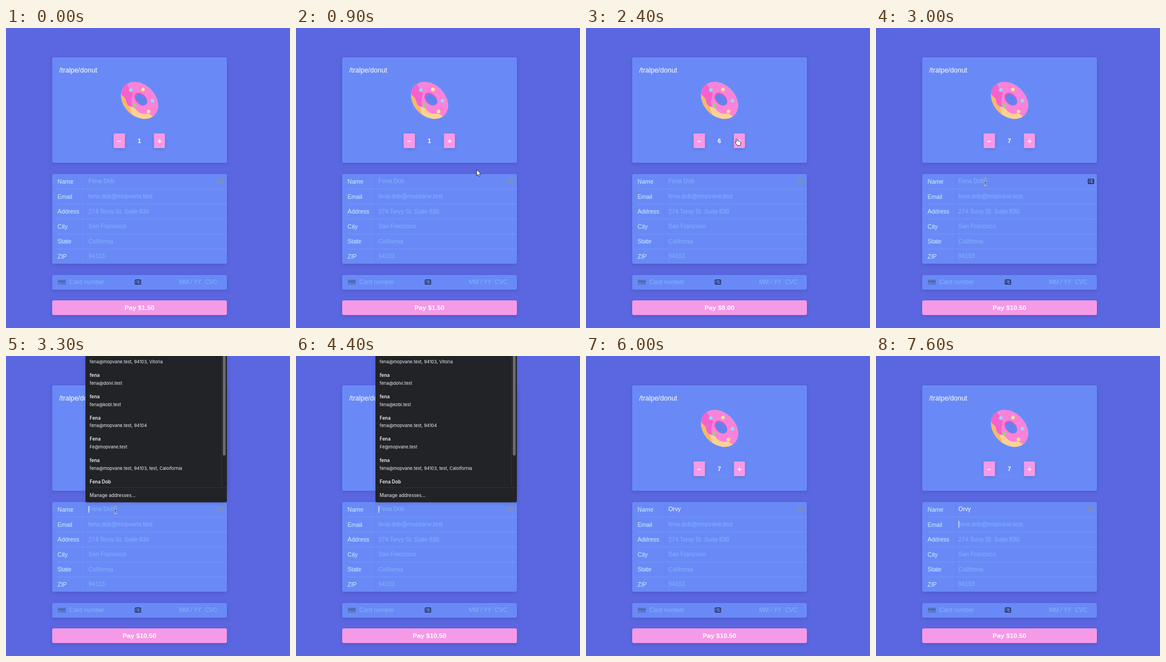
Recreate the animation shown at these times as an HTML page. Size 504x532 px, loop 8 s.

```html
<!DOCTYPE html>
<html lang="en">
<head>
<meta charset="utf-8">
<title>Donut checkout</title>
<style>
  html, body { margin: 0; width: 100%; height: 100%; overflow: hidden; background: #5a67e1; }
  svg { display: block; width: 504px; height: 532px; }
  text { font: 10.45px "Liberation Sans", Arial, sans-serif; white-space: pre; }
  .card { fill: #698af6; }
  .raised { filter: drop-shadow(0 2px 3px rgba(40, 42, 110, .22)); }
  .label { fill: #d2f0ff; }
  .hint { fill: #82b3fa; }
  .white { fill: #fff; }
  .bold { font-weight: 700; fill: #fff; text-anchor: middle; }
  .pink { fill: #f59ae6; }
  .rule { stroke: #7a9af8; stroke-width: .8; }
  .popup text { font: 7.85px Inter, "Open Sans", sans-serif; fill: #f0f0f1; }
  .popup .who { font-size: 8.3px; font-weight: 600; }
  .popup .manage { font-size: 8.25px; }
  .cursor { fill: #fff; stroke: #111; stroke-width: .8; stroke-linejoin: round; }
</style>
</head>
<body>
<svg viewBox="0 0 504 532">
  <defs>
    <clipPath id="dough"><ellipse cx="237" cy="128.5" rx="37" ry="28" transform="rotate(45 237 128.5)"/></clipPath>
    <clipPath id="hole"><ellipse cx="239.3" cy="126" rx="13.2" ry="9.2" transform="rotate(45 239.3 126)"/></clipPath>
    <clipPath id="list"><rect x="141" y="0" width="251" height="230"/></clipPath>
    <g id="badge">
      <rect x=".6" y=".6" width="9.8" height="7.8" rx="1" fill="none" stroke="currentColor" stroke-width="1.2"/>
      <circle cx="3.6" cy="3.6" r="1.2" fill="currentColor"/>
      <path d="M1.6 6.9q2-2.7 4 0z" fill="currentColor"/>
      <path d="M6.6 3.2h2.6M6.6 5.4h2.6" stroke="currentColor"/>
    </g>
  </defs>

  <rect width="504" height="532" fill="#5a67e1"/>
  <rect class="card raised" x="82" y="52" width="310" height="187" rx="2.7"/>
  <text class="white" x="94.5" y="78.5" style="font-size:12.1px">/tralpe/donut</text>

  <g clip-path="url(#dough)">
    <rect x="200" y="90" width="75" height="75" fill="#fdd295"/>
    <path d="M200 100L216 128L226 160L200 160z" fill="#f9b768"/>
    <path d="M200 90H275V158C268 161 262 159 257 154C251 149 246 154 239 151C231 148 231 141 224 140C217 139 214 135 213 128C211 121 206 122 203 114z" fill="#fb82da"/>
    <path d="M200 90H216C211 102 221 107 224 114C227 122 219 126 224 140C217 139 214 135 213 128C211 121 206 122 203 114z" fill="#f661cc"/>
  </g>
  <g clip-path="url(#hole)">
    <rect x="224" y="110" width="32" height="32" fill="#e457bd"/>
    <ellipse cx="240.4" cy="127.4" rx="12.2" ry="8" transform="rotate(45 240.4 127.4)" fill="#6482ee"/>
  </g>
  <g id="sprinkles"></g>

  <rect x="211" y="187.5" width="52" height="25.5" fill="none" stroke="#7090f6" stroke-width=".8"/>
  <g class="raised">
    <path class="pink" d="M211 187H193q-2 0-2 2v22q0 2 2 2h18z"/>
    <path class="pink" d="M262.5 187H280q2 0 2 2v22q0 2-2 2h-17.5z"/>
  </g>
  <path d="M197.8 200.9h6M269.2 200.9h6.6M272.5 197.6v6.6" stroke="#fff" stroke-width="1.5"/>
  <text class="bold" id="qty" x="236.6" y="204"></text>

  <rect class="card raised" x="82" y="259" width="310" height="159" rx="2.7"/>
  <path d="M141.3 259V418" stroke="#6180ee" stroke-width=".6"/>
  <g id="form"></g>
  <use href="#badge" id="nameBadge" x="376" y="267.4"/>
  <text class="white" id="typed" x="146.3" y="275.4"></text>

  <rect class="card raised" x="82" y="438" width="310" height="26" rx="2.7"/>
  <g fill="#5876c6">
    <rect x="92" y="446.2" width="14" height="9" rx="1"/>
    <path d="M92 448.4h14v2H92z" fill="#4a63aa"/>
    <path d="M93.5 452.6h4v1h-4z" fill="#7394ea"/>
  </g>
  <text class="hint" x="112.5" y="454.2" style="font-size:10.6px">Card number</text>
  <use href="#badge" x="228.6" y="446" color="#171b33"/>
  <text class="hint" x="307" y="454.2">MM / YY</text>
  <text class="hint" x="353" y="454.2">CVC</text>

  <rect class="pink raised" x="82" y="483" width="310" height="26" rx="2.7"/>
  <text class="bold" id="pay" x="236.8" y="500.3" style="font-size:11.7px"></text>

  <g id="popup" class="popup">
    <path class="raised" d="M141 0H392V256.5q0 3-3 3H144q-3 0-3-3z" fill="#222327"/>
    <g id="people" clip-path="url(#list)"></g>
    <path d="M382.5 0V230M141 233.3H392" stroke="#37383c" stroke-width=".8"/>
    <rect x="384.8" y="-6" width="5" height="182.5" rx="2.5" fill="#6b6c6f"/>
    <text class="manage" x="148.6" y="249.7">Manage addresses...</text>
  </g>

  <rect id="caret" width="1" height="12" fill="#fff"/>
  <g id="cursor" class="cursor">
    <path id="arrow" d="M0 0V11L2.6 8.7L4.4 12.6L6.2 11.8L4.5 8H8z"/>
    <path id="hand" d="M-2.6-4.6q1-1.4 2 0l1.1 3.3q1-1 1.7.2q1-.8 1.7.3q1.2-.5 1.5.9q.7 2.2-.3 4.2l-.2 2.2h-5.2q-.6-1.6-2-2.8l-2.4-2.6q.2-1.7 2.3-.4z"/>
    <g id="beam" fill="none">
      <path d="M-2.3-5.6q2 0 2.3 1.2q.3-1.2 2.3-1.2M0-4.4V4.4M-2.3 5.6q2 0 2.3-1.2q.3 1.2 2.3 1.2M-1.2 1.6h2.4" stroke="#fff" stroke-width="2.4"/>
      <path d="M-2.3-5.6q2 0 2.3 1.2q.3-1.2 2.3-1.2M0-4.4V4.4M-2.3 5.6q2 0 2.3-1.2q.3 1.2 2.3 1.2M-1.2 1.6h2.4" stroke="#222" stroke-width="1"/>
    </g>
  </g>
</svg>

<script>
const LOOP = 8000;
const $ = id => document.getElementById(id);

function add(parent, tag, attrs, text = '') {
  const node = document.createElementNS('http://www.w3.org/2000/svg', tag);
  for (const key in attrs) node.setAttribute(key, attrs[key]);
  node.textContent = text;
  return $(parent).appendChild(node);
}

[[221.5, 110, '#7fe3f7'], [243, 109, '#fbe08c'], [260, 129, '#7fe3f7'],
 [228, 137, '#8fd873'], [253, 148, '#fbe08c']]
  .forEach(([cx, cy, fill]) => add('sprinkles', 'circle', { cx, cy, r: 3.2, fill }));

const hints = [
  ['Name', 'Fena Dob'],
  ['Email', 'fena.dob@mopvane.test'],
  ['Address', '274 Torvy St. Suite 830'],
  ['City', 'San Francisco'],
  ['State', 'California'],
  ['ZIP', '94103'],
].map(([label, hint], i) => {
  const y = 275.6 + i * 26.6;
  if (i) add('form', 'path', { class: 'rule', d: `M92 ${258.9 + i * 26.6}H392` });
  add('form', 'text', { class: 'label', x: 91.6, y: y + .3 }, label);
  return add('form', 'text', { class: 'hint', x: 146.3, y: y - .2 }, hint);
});

[
  ['', 'fena@mopvane.test, 94103, Vitoria'],
  ['fena', 'fena@dolvi.test'],
  ['fena', 'fena@kobl.test'],
  ['Fena', 'fena@mopvane.test, 94104'],
  ['Fena', 'Fe@mopvane.test'],
  ['fena', 'fena@mopvane.test, 94103, test, Caloifornia'],
  ['Fena Dob', ''],
].forEach(([who, info], i) => {
  const y = i * 37.7;
  add('people', 'text', { class: 'who', x: 148.6, y: y - .6 }, who);
  add('people', 'text', { x: 148.6, y: y + 13.2 }, info);
});

// Each track is a list of [start time, value]; values hold until the next entry.
const quantity = [[0, 1], [1200, 2], [1500, 3], [1700, 4], [2000, 5], [2400, 6], [2800, 7]];
const typing = [[0, ''], [4500, 'O'], [4800, 'Or'], [5000, 'Orv'], [5500, 'Orvy']];
const caretField = [[0, ''], [3300, 'name'], [3800, ''], [4300, 'name'], [6000, ''],
                    [6500, 'name'], [6600, 'email'], [7100, ''], [7600, 'email']];
const pointer = [[0, ''], [300, 'arrow'], [1100, 'hand'], [2900, 'arrow'], [3000, 'beam'], [4200, '']];
const path = [[300, 478, 440], [700, 372, 300], [1100, 269, 202], [2800, 269, 202], [3000, 194, 273]];

const at = (track, t) => track.findLast(([start]) => start <= t)[1];

function position(t) {
  const next = path.findIndex(p => p[0] > t);
  if (next === 0) return path[0].slice(1);
  if (next < 0) return path.at(-1).slice(1);
  const [a, b] = [path[next - 1], path[next]];
  const k = (t - a[0]) / (b[0] - a[0]);
  return [1, 2].map(i => a[i] + (b[i] - a[i]) * k);
}

const show = (id, on) => { $(id).style.display = on ? '' : 'none'; };

function render(t) {
  const count = at(quantity, t);
  $('qty').textContent = count;
  $('pay').textContent = `Pay $${(count * 1.5).toFixed(2)}`;

  const name = at(typing, t);
  $('typed').textContent = name;
  hints[0].style.display = name ? 'none' : '';

  show('popup', t >= 3300 && t < 4500);
  $('nameBadge').style.color = t >= 3000 && t < 3300 ? '#0b0d18' : '#8e9098';

  const field = at(caretField, t);
  const width = name ? $('typed').getComputedTextLength() : 0;
  show('caret', field);
  $('caret').setAttribute('x', field === 'name' ? 146.5 + width : 146.5);
  $('caret').setAttribute('y', field === 'email' ? 292.5 : 266);

  const shape = at(pointer, t);
  ['arrow', 'hand', 'beam'].forEach(id => show(id, id === shape));
  const [x, y] = position(Math.floor(t / 100) * 100);
  $('cursor').setAttribute('transform', `translate(${x} ${y})`);
}

const start = performance.now();
function tick() {
  render((performance.now() - start) % LOOP);
  requestAnimationFrame(tick);
}
tick();
</script>
</body>
</html>
```
